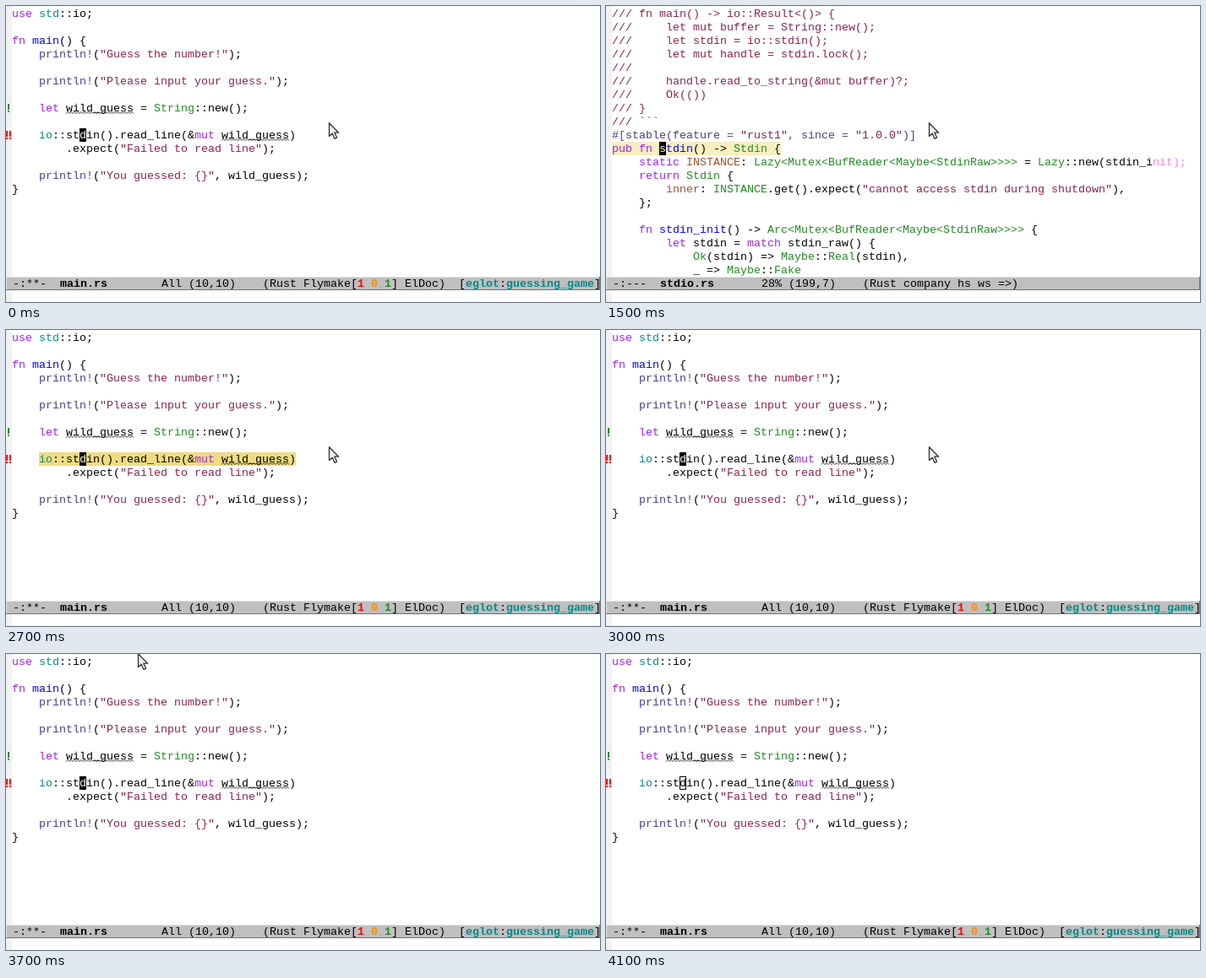
Recreate the animation shown at these times as an HTML page. Size 703 px wide and 351 px high, loop 4400 ms.

```html
<!DOCTYPE html>
<html lang="en">
<head>
<meta charset="utf-8">
<title>Jump to definition</title>
<style>
  html, body { margin: 0; width: 100%; height: 100%; overflow: hidden; background: #fff; }
  svg { display: block; width: 703px; height: 351px; }
  text {
    font: 13.333px "Liberation Mono", "Noto Sans Mono", monospace;
    font-variant-ligatures: none;
    white-space: pre;
  }
  .bold { font-weight: bold; }
</style>
</head>
<body>
<svg id="stage" viewBox="0 0 703 351" xmlns="http://www.w3.org/2000/svg"></svg>
<script>
const LOOP = 4400, CELL = 8, ROW = 16, LEFT = 7, TOP = 1, BASELINE = 12;
const stage = document.getElementById('stage');
const colX = col => LEFT + col * CELL;
const rowY = row => TOP + row * ROW;

const COLOR = {
  doc: '#8b2252', string: '#8b2252', keyword: '#a020f0', func: '#0000ff',
  macro: '#483d8b', module: '#008b8b', variable: '#a0522d', type: '#228b22'
};
const SYNTAX = new RegExp([
  '(?<doc>^///.*)',
  '(?<string>"[^"]*")',
  '(?<keyword>\\b(?:use|fn|let|mut|pub|static|return|match)\\b)',
  '(?<func>(?<=fn )\\w+)',
  '(?<macro>\\w+!)',
  '(?<module>\\b[a-z]\\w*(?=::))',
  '(?<variable>\\b\\w+(?=: ))',
  '(?<type>\\b[A-Z][\\w<>]*)'
].join('|'), 'g');

const MAIN = `use std::io;

fn main() {
    println!("Guess the number!");

    println!("Please input your guess.");

    let wild_guess = String::new();

    io::stdin().read_line(&mut wild_guess)
        .expect("Failed to read line");

    println!("You guessed: {}", wild_guess);
}`;

const STDIO = `/// fn main() -> io::Result<()> {
///     let mut buffer = String::new();
///     let stdin = io::stdin();
///     let mut handle = stdin.lock();
///
///     handle.read_to_string(&mut buffer)?;
///     Ok(())
/// }
/// \`\`\`
#[stable(feature = "rust1", since = "1.0.0")]
pub fn stdin() -> Stdin {
    static INSTANCE: Lazy<Mutex<BufReader<Maybe<StdinRaw>>>> = Lazy::new(stdin_init);
    return Stdin {
        inner: INSTANCE.get().expect("cannot access stdin during shutdown"),
    };

    fn stdin_init() -> Arc<Mutex<BufReader<Maybe<StdinRaw>>>> {
        let stdin = match stdin_raw() {
            Ok(stdin) => Maybe::Real(stdin),
            _ => Maybe::Fake`;

function add(parent, tag, attrs, content) {
  const node = document.createElementNS('http://www.w3.org/2000/svg', tag);
  for (const key in attrs) node.setAttribute(key, attrs[key]);
  if (content) node.textContent = content;
  return parent.appendChild(node);
}

const box = (parent, x, y, width, height, fill) =>
  add(parent, 'rect', { x, y, width, height, fill });

const write = (parent, x, row, fill, content, bold) =>
  add(parent, 'text', { x, y: rowY(row) + BASELINE, fill, class: bold ? 'bold' : '' }, content);

function lineColors(line) {
  const colors = Array(line.length).fill(line.startsWith('#') ? COLOR.macro : '#000');
  for (const match of line.matchAll(SYNTAX)) {
    const kind = Object.keys(match.groups).find(name => match.groups[name]);
    colors.fill(COLOR[kind], match.index, match.index + match[0].length);
  }
  return colors.fill('#ee82ee', 80); // tail of an overlong line
}

function writeCode(parent, source) {
  source.split('\n').forEach((line, row) => {
    const colors = lineColors(line);
    for (let start = 0, end; start < line.length; start = end) {
      end = start + 1;
      while (end < line.length && colors[end] === colors[start]) end++;
      const run = line.slice(start, end), word = run.trimStart();
      if (word) write(parent, colX(end - word.length), row, colors[start], word);
    }
  });
}

function modeLine(parent, parts) {
  const y = rowY(20);
  box(parent, 0, y, 703, ROW, '#bfbfbf');
  box(parent, 0, y, 703, 1, '#e5e5e5');
  box(parent, 0, y, 1, ROW, '#e5e5e5');
  box(parent, 0, y + ROW - 1, 703, 1, '#727272');
  box(parent, 702, y, 1, ROW, '#727272');
  for (const [col, content, color] of parts)
    write(parent, (col + 1) * CELL, 20, color || '#000', content, color);
}

function blockCursor(parent, col, row, letter) {
  const group = add(parent, 'g', {});
  box(group, colX(col), rowY(row), CELL, ROW, '#000');
  write(group, colX(col), row, '#fff', letter);
  return group;
}

function squiggle(parent, col, row, length) {
  let path = `M${colX(col)} ${rowY(row) + 14.5}`;
  for (let i = 0; i < length * CELL / 2; i++) path += `l2 ${i % 2 ? 2 : -2}`;
  add(parent, 'path', { d: path, fill: 'none', stroke: '#000', 'stroke-width': 0.8 });
}

function exclamation(parent, x, row, color) {
  box(parent, x, rowY(row) + 3, 2, 7, color);
  box(parent, x, rowY(row) + 11, 2, 2, color);
}

function screen(source, pulseBox, parts) {
  const group = add(stage, 'g', {});
  box(group, 0, 0, LEFT, 351, '#f2f2f2');
  const [col, row, length] = pulseBox;
  const pulse = box(group, colX(col), rowY(row), length * CELL, ROW, 'none');
  writeCode(group, source);
  modeLine(group, parts);
  return { group, pulse };
}

const main = screen(MAIN, [4, 9, 38], [
  [0, '-:**-'], [7, 'main.rs', '#000'], [22, 'All (10,10)'], [37, '(Rust Flymake['],
  [51, '1', '#ff0000'], [53, '0', '#ff8c00'], [55, '1', '#228b22'], [56, '] ElDoc)'],
  [66, '['], [67, 'eglot', '#008b8b'], [72, ':'], [73, 'guessing_game', '#008b8b'], [86, ']']
]);
squiggle(main.group, 8, 7, 10);
squiggle(main.group, 31, 9, 10);
exclamation(main.group, 2, 7, '#228b22');
exclamation(main.group, 0, 9, '#ff0000');
exclamation(main.group, 4, 9, '#ff0000');
const solidCursor = blockCursor(main.group, 10, 9, 'd');
const hollowCursor = add(main.group, 'rect', {
  x: colX(10) + 0.5, y: rowY(9) + 0.5, width: CELL - 1, height: ROW - 1,
  fill: 'none', stroke: '#000'
});

const stdio = screen(STDIO, [0, 10, 25], [
  [0, '-:---'], [7, 'stdio.rs', '#000'], [22, '28% (199,7)'], [37, '(Rust company hs ws =>)']
]);
blockCursor(stdio.group, 7, 10, 's');

const pointer = add(stage, 'path', {
  d: 'M.5 .8V16.6L4.2 13.2L6.9 19.3L9.6 18.1L6.9 12.2H11.7Z',
  fill: '#ececec', stroke: '#333', 'stroke-width': 1.3, 'stroke-linejoin': 'round'
});

const POINTER_PATH = [
  [0, 382, 138], [3500, 344, 115], [3600, 246, 55], [3700, 156, -1],
  [3800, 120, -11], [3900, 110, -15]
];

const show = (node, visible) => node.setAttribute('display', visible ? 'inline' : 'none');

function render(t) {
  const inStdio = t >= 1300 && t < 2700;
  show(main.group, !inStdio);
  show(stdio.group, inStdio);
  stdio.pulse.setAttribute('fill', t < 1500 ? '#eedc82' : t < 1800 ? '#f7eec1' : 'none');
  main.pulse.setAttribute('fill', t >= 2700 && t < 3000 ? '#eedc82' : 'none');

  const focused = t < 3900;
  show(solidCursor, focused);
  show(hollowCursor, !focused);

  const [, x, y] = POINTER_PATH.findLast(([start]) => t >= start);
  pointer.setAttribute('transform', `translate(${x} ${y})`);
  show(pointer, t < 4100);
}

const started = performance.now();
function tick() {
  render((performance.now() - started) % LOOP);
  requestAnimationFrame(tick);
}
tick();
</script>
</body>
</html>
```
